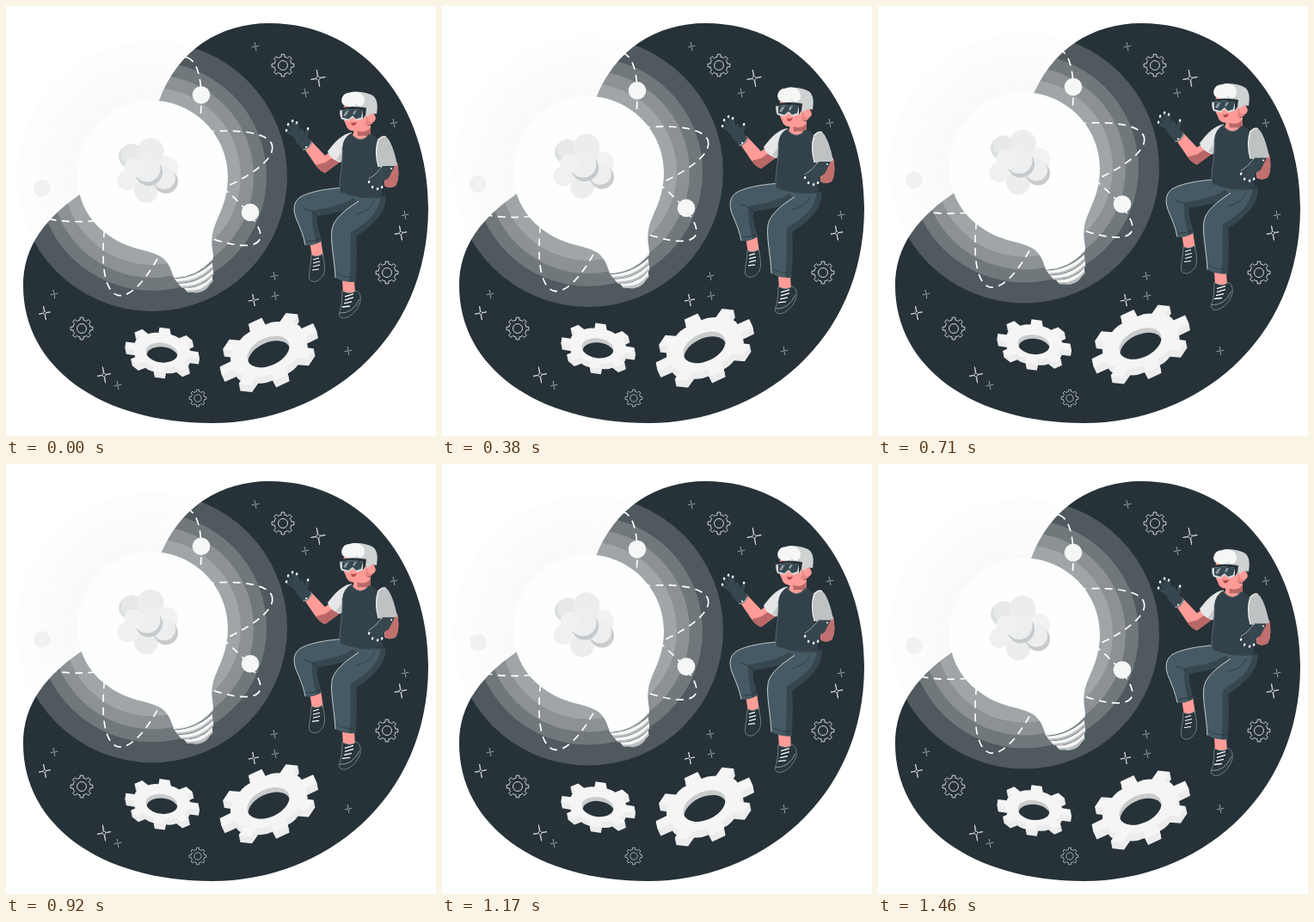
Animation, 500 px wide and 500 px high, one loop 1.5 s. Source, as an HTML page with a canvas:

```html
<!DOCTYPE html>
<html lang="en">
<head>
<meta charset="utf-8">
<title>Floating idea</title>
<style>
html, body { margin: 0; width: 100%; height: 100%; overflow: hidden; background: #fff; }
canvas { display: block; width: 100vw; height: 100vh; }
</style>
</head>
<body>
<canvas id="stage" width="500" height="500"></canvas>
<script>
const ctx = document.getElementById('stage').getContext('2d');
const LOOP = 1500, LIFT = 10, TAU = Math.PI * 2;
const NIGHT = '#263238', SLATE = '#455a64', DEEP = '#37474f', SKIN = '#ff9c97', SHADE = '#b96867';
const BRIGHT = '#e4e7e8', DIM = '#8f989c';

function paint(path, fill, stroke, width = 1) {
  const p = typeof path === 'string' ? new Path2D(path) : path;
  if (fill) { ctx.fillStyle = fill; ctx.fill(p); }
  if (stroke) { ctx.strokeStyle = stroke; ctx.lineWidth = width; ctx.stroke(p); }
}

function disc(x, y, r, fill) {
  const p = new Path2D();
  p.arc(x, y, r, 0, TAU);
  paint(p, fill);
}

function at(x, y, degrees, draw) {
  ctx.save();
  ctx.translate(x, y);
  ctx.rotate(degrees * Math.PI / 180);
  draw();
  ctx.restore();
}

function gearPath(rx, ry, root) {
  const p = new Path2D();
  const corners = [[-0.25, root], [-0.18, 1], [0.18, 1], [0.25, root]];
  for (let i = 0; i < 8; i++) {
    for (const [offset, r] of corners) {
      const a = (i + offset) * TAU / 8;
      p.lineTo(Math.cos(a) * rx * r, Math.sin(a) * ry * r);
    }
    const mid = (i + 0.5) * TAU / 8, end = (i + 0.75) * TAU / 8;
    p.quadraticCurveTo(Math.cos(mid) * rx * root * 1.06, Math.sin(mid) * ry * root * 1.06,
      Math.cos(end) * rx * root, Math.sin(end) * ry * root);
  }
  p.closePath();
  return p;
}

function lineGear(x, y, r, color) {
  at(x, y, 0, () => {
    paint(gearPath(r, r, 0.77), null, color, 0.9);
    const hole = new Path2D();
    hole.arc(0, 0, r * 0.42, 0, TAU);
    paint(hole, null, color, 0.9);
  });
}

function sparkle(x, y, r, color) {
  at(x, y, -10, () => {
    const p = new Path2D();
    const tips = [[0, -r], [r * 0.85, 0], [0, r], [-r * 0.85, 0]];
    p.moveTo(0, -r);
    for (let i = 1; i <= 4; i++) p.bezierCurveTo(0, 0, 0, 0, ...tips[i % 4]);
    paint(p, null, color, 0.8);
  });
}

function backdrop() {
  ctx.fillStyle = '#fff';
  ctx.fillRect(0, 0, 500, 500);
  paint('M20 325C20 280 45 245 95 213C160 185 162 155 178 110C200 50 250 20 306 20' +
    'C420 20 491 120 491 235C491 390 370 485 240 485C110 485 20 420 20 325Z', NIGHT);
  [[322, 69, 13], [88, 375, 13], [443, 310, 13]].forEach(g => lineGear(...g, BRIGHT));
  lineGear(223, 456, 10, '#b3b9bc');
  [[363, 84, 10], [45, 357, 8], [114, 429, 9.5], [459, 264, 8.5], [288, 342, 7]]
    .forEach(s => sparkle(...s, BRIGHT));
  [[290, 47], [348, 101], [451, 136], [464, 243], [312, 314], [313, 337], [398, 401], [56, 335], [130, 441]]
    .forEach(s => sparkle(...s, 5, DIM));
}

function glow() {
  for (const r of [157, 133, 118, 103]) disc(170, 198, r, 'rgba(245,245,245,.2)');
}

function orbits() {
  ctx.setLineDash([9, 6.5]);
  for (const [a, b, tilt] of [[144, 40, -14.4], [145, 36, 30.8], [144, 42, -73.7]]) {
    const p = new Path2D();
    p.ellipse(170, 198, a, b, tilt * Math.PI / 180, 0, TAU);
    paint(p, null, '#fff', 1.7);
  }
  ctx.setLineDash([]);
  disc(227, 103.5, 10.3, '#f5f6f6');
  disc(284, 240, 10.3, '#f5f6f6');
  disc(42, 212, 10, '#f0f2f2');
}

function screwBase() {
  at(217, 306, -23, () => {
    paint('M-13 20C-12 31 12 31 13 20Z', '#b4b8ba');
    for (const [y, half] of [[16, 18], [9, 22], [2, 24]]) {
      paint(`M${-half} ${y}Q0 ${y + 9} ${half} ${y}L${half - 2} ${y + 6}Q0 ${y + 15} ${2 - half} ${y + 6}Z`, '#f5f6f6');
      paint(`M${2 - half} ${y + 5}Q0 ${y + 14} ${half - 2} ${y + 5}`, null, '#b9bdbf', 2);
    }
  });
}

function bulb() {
  screwBase();
  paint('M83 198C83 150 122 110 170 110C218 110 258 150 258 198C258 232 243 247 240 266' +
    'C238 276 241 285 241 293Q222 315 195 316C192 306 189 298 181 292C170 285 156 284 143 279' +
    'C108 266 83 237 83 198Z', '#fdfefe');
  paint('M195 316Q223 315 241 294', null, '#e3e5e6', 1);

  disc(186, 188, 14, '#f1f2f2');
  disc(141, 203, 11.5, '#eff0f0');
  disc(163, 215, 14, '#eceded');
  disc(144, 175, 13, '#dcdfe0');
  disc(146, 172, 12, '#e6e8e9');
  disc(186, 204, 14, '#c9cbcd');
  disc(184, 200, 13, '#eceeef');
  disc(166, 193, 16, '#c7cacc');
  disc(168, 169, 15.5, '#ebedee');
  disc(164, 189, 15.5, '#eceeef');
  disc(149, 188, 11.5, '#eff1f2');
}

function solidGear(x, y, rx, ry, tilt, depth) {
  const outline = gearPath(rx, ry, 0.76);
  for (let d = depth; d >= 0; d--) {
    at(x + d * 0.2, y + d, tilt, () => paint(outline, d ? '#ececed' : '#f5f5f6'));
  }
  const ring = new Path2D();
  ring.ellipse(0, 0, rx * 0.43, ry * 0.44, 0, 0, TAU);
  at(x, y + 3, tilt, () => {
    paint(ring, '#c9cbcc');
    ctx.clip(ring);
    ctx.rotate(-tilt * Math.PI / 180);
    ctx.translate(1, depth * 0.7);
    ctx.rotate(tilt * Math.PI / 180);
    paint(ring, NIGHT);
  });
}

function farLeg() {
  paint('M353 273L366 271L369 291L356 293Z', SKIN);
  paint('M355 289C360 292 364 291 368 288C370 297 372 307 369 313C365 320 358 323 353 318C351 312 355 301 355 289Z',
    '#29363c', '#8f9a9f', 0.7);
  paint('M357 295L364 293M357 299L365 297M357 303L365 301M356 307L364 306', null, '#fff', 1.2);
  paint('M396 211C374 212 351 216 341 223C334 229 334 237 337 246C342 258 346 267 348 278' +
    'C355 279 362 277 367 273C363 260 360 251 362 244C379 241 401 238 412 228Z', SLATE);
  paint('M367 273C363 260 360 251 362 244C379 241 401 238 412 228L404 223C388 234 368 235 356 238Q355 254 361 276Z', DEEP);
  paint('M396 211C374 212 351 216 341 223C334 229 334 237 337 246C342 258 346 267 348 278', null, BRIGHT, 0.8);
  paint('M349 274Q359 274 366 270M362 244C357 239 352 237 347 236', null, NIGHT, 0.8);
}

function nearLeg() {
  paint('M391 319L405 319L406 334L392 335Z', SKIN);
  paint('M391 331C398 335 403 334 407 331C411 332 413 337 412 344C409 354 400 363 392 363C387 362 386 358 389 353Q391 344 391 331Z',
    '#29363c', '#8f9a9f', 0.7);
  paint('M394 338L404 335M394 342L404 339M393 346L402 344M391 350L400 349', null, '#fff', 1.3);
  paint('M388 357Q403 358 411 341', null, '#aab0b3', 0.8);
  paint('M391 212Q416 224 441 221C443 236 432 251 407 268C408 286 407 304 407 320Q396 323 383 316' +
    'C382 294 377 274 379 260C381 248 393 238 408 227Q400 220 388 216Z', SLATE);
  paint('M441 222C443 236 432 251 407 268L407 320Q402 322 399 320C402 298 400 283 401 263C423 250 433 240 436 222Z', DEEP);
  paint('M383 316C382 294 377 274 379 260C381 248 393 238 410 227', null, '#eceeef', 0.8);
  paint('M384 311Q397 317 407 315M388 214Q409 226 440 222M429 226Q423 239 407 242', null, '#2d3a41', 0.8);
}

function finger(x, y, tipX, tipY) {
  paint(`M${x} ${y}L${tipX} ${tipY}`, null, DEEP, 3.8);
  paint(`M${tipX} ${tipY}l.2 -.8`, null, '#f2f3f3', 2.4);
}

function raisedArm() {
  paint('M345 163L354 156L371 174L387 162L397 175L371 194Q365 192 360 185Z', SKIN);
  paint('M360 185L371 182L389 170L397 175L371 194Q365 192 360 185Z', SHADE);
  paint('M402 147C391 149 383 157 374 169C376 176 382 180 389 182L398 169Z', '#e5e6e7');
  paint('M390 181L398 166L394 164L384 179Z', '#c6c9ca');
  ctx.lineCap = 'round';
  for (const [x, y] of [[326, 145], [328, 138], [333, 134], [338, 136]]) finger(340, 154, x, y);
  finger(348, 157, 351, 143);
  paint('M334 147L344 142L349 151L356 159Q352 167 346 168L337 158Z', DEEP);
  paint('M346 167Q352 166 355 159', null, '#cbd0d2', 0.9);
  disc(349, 164, 1, '#fff');
  ctx.lineCap = 'butt';
}

function torso() {
  paint('M406 140L424 139L424 154Q412 166 403 151Z', SKIN);
  paint('M408 145Q418 149 424 141L424 152Q417 150 409 151Z', SHADE);
  paint('M401 148Q412 162 422 149Q431 150 433 159C430 181 434 201 438 220Q415 226 388 216' +
    'C387 198 392 181 391 165Q392 153 401 148Z', '#33424a');
  paint('M401 148Q412 162 422 149M391 164C392 184 387 201 388 216', null, '#6b777d', 0.7);
}

function loweredArm() {
  paint('M441 183L455 182C457 193 457 202 453 209Q446 213 440 209Z', SKIN);
  paint('M445 187L455 184C457 193 457 202 453 209Q446 213 440 209Z', '#c0706e');
  paint('M432 155Q441 147 446 157C451 166 453 176 455 185Q444 190 433 187Q428 168 432 155Z', '#bfc2c3');
  paint('M433 157Q428 168 433 187M433 156Q437 150 442 152', null, '#f1f2f2', 1.2);
  ctx.lineCap = 'round';
  for (const [x, y] of [[422, 205], [426, 211], [432, 213], [437, 211]]) finger(438, 197, x, y);
  paint('M429 197L438 186L452 186L445 200L434 207Z', DEEP);
  paint('M437 187L429 196L422 201', null, '#cdd1d3', 0.7);
  disc(448, 189, 1, '#fff');
  ctx.lineCap = 'butt';
}

function face() {
  paint('M394 113L423 112L426 129Q421 141 409 143Q398 144 396 135Q391 127 394 113Z', SKIN);
  paint('M418 111Q427 104 428 121Q432 127 427 134Q423 138 419 135L414 141Q424 130 417 120Z', '#e78582');
  disc(426, 128, 4.8, SKIN);
  paint('M402 133Q406 134 409 132Q407 138 403 136Z', '#b74849');
}

function hair() {
  paint('M393 112C389 107 393 98 401 98C409 96 422 98 428 102C434 107 433 116 432 123' +
    'Q425 121 421 127L417 116Q404 118 393 112Z', '#cfd2d3');
  paint('M393 112C389 106 393 98 400 99C406 95 415 98 417 103C420 111 415 116 409 114Q400 117 393 112Z', '#f5f6f6');
  paint('M407 112Q411 116 418 115', null, '#b9bdbf', 1);
}

function goggles() {
  paint('M390 117Q405 113 419 116Q421 121 418 128L409 131L404 127L399 131L391 129Q388 123 390 117Z', '#d5d9da');
  paint('M390 116Q404 113 420 116L419 124L416 129L416 119Q404 116 390 119Z', NIGHT);
  paint('M392 119Q405 116 416 119L414 127L408 129L404 125L399 129L392 127Z', '#364850');
  paint('M396 120L400 119L396 126L393 125ZM406 119L409 119L406 124L404 123Z', '#879aa3');
}

function character() {
  farLeg();
  nearLeg();
  raisedArm();
  torso();
  loweredArm();
  at(-1, 2.5, 0, () => {
    face();
    hair();
    goggles();
  });
}

function frame(now) {
  const phase = (now % LOOP) / LOOP;
  const lift = LIFT * (1 - Math.abs(1 - 2 * phase));
  backdrop();
  at(0, -lift, 0, () => {
    glow();
    orbits();
    bulb();
    solidGear(181, 400, 43, 26, 8, 7);
    solidGear(305, 399, 60.5, 36.7, -25, 8);
    character();
  });
  requestAnimationFrame(frame);
}
requestAnimationFrame(frame);
</script>
</body>
</html>
```
